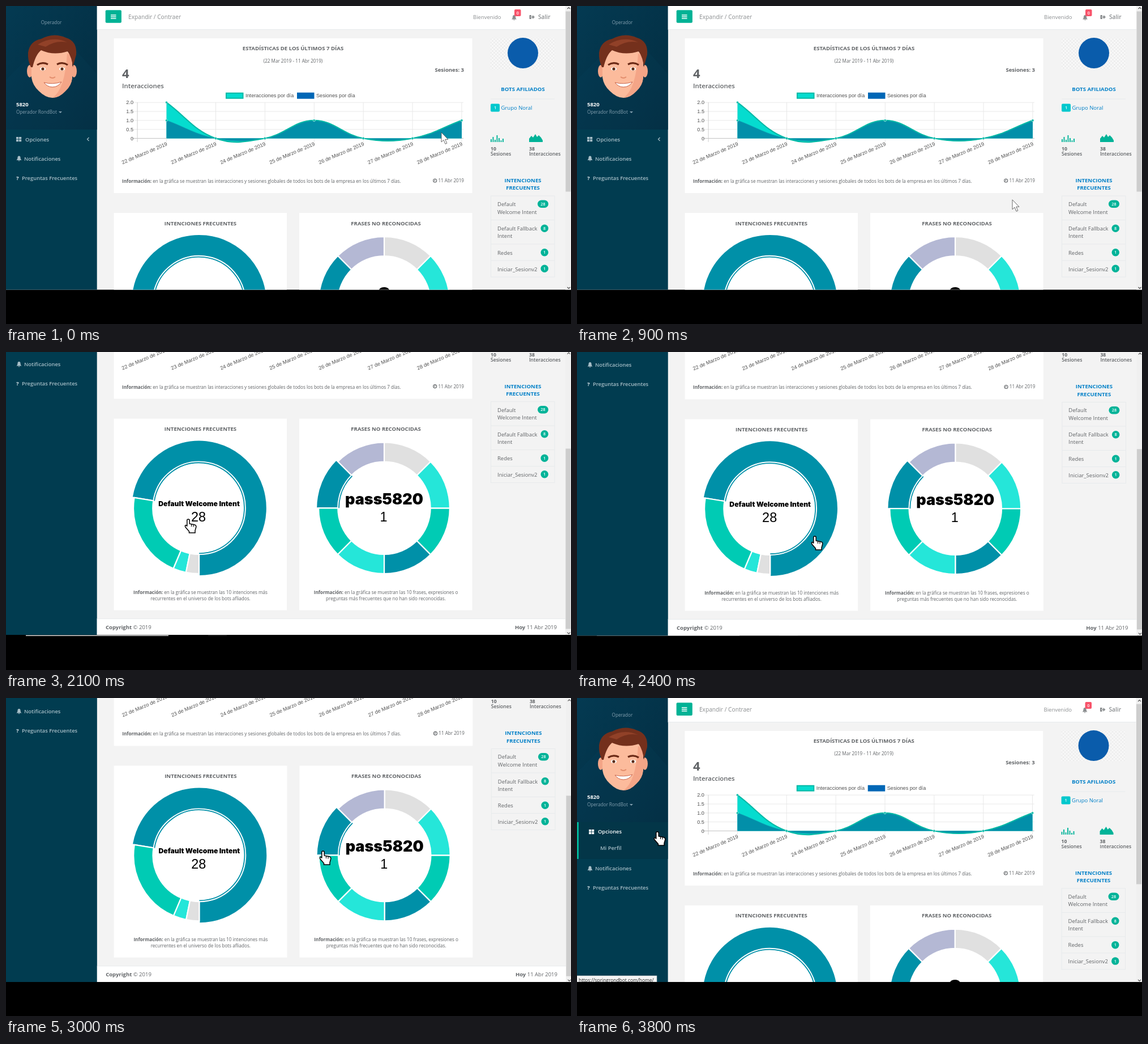
Recreate the animation shown at these times as an HTML page. Size 998 px wide and 561 px high, loop 4000 ms.

```html
<!DOCTYPE html>
<html lang="es">
<head>
<meta charset="utf-8">
<title>Panel de control</title>
<style>
  html, body { margin: 0; width: 100%; height: 100%; overflow: hidden; background: #000; }
  svg { display: block; width: 100%; height: 100%; }
  text { font: 9.5px "Open Sans", sans-serif; fill: #606366; white-space: pre; }
  .bold { font-weight: 700; }
  .title { font-weight: 700; font-size: 9.6px; text-anchor: middle; }
  .semi { font-weight: 600; }
  .mid { text-anchor: middle; }
  .end { text-anchor: end; }
  .small { font-size: 8.15px; }
  .nav { font-weight: 600; font-size: 9.4px; fill: #a7bec7; }
  .mark { font-weight: 800; fill: #b9ccd3; }
  .pale { fill: #84a0b0; }
  .white { fill: #fff; }
  .blue { fill: #0080c8; }
  .gray { fill: #8b8e90; }
  .large { font-size: 10.2px; }
  .count { font-size: 7.3px; font-weight: 600; fill: #fff; text-anchor: middle; }
  .axis { font: 9.15px "Liberation Sans", Arial, sans-serif; fill: #505050; }
  .heavy { font-family: Inter, "DejaVu Sans", sans-serif; font-weight: 900; fill: #000; text-anchor: middle; }
  .value { font: 23.4px "Liberation Sans", Arial, sans-serif; fill: #000; text-anchor: middle; }
</style>
</head>
<body>
<svg id="stage" viewBox="0 0 998 561"></svg>
<script>
const LOOP = 4000;
const GREEN = '#00b398', LINE = '#e7eaec', TEAL = '#00b8a5', DARK = '#0090a8';
const PALETTE = [DARK, '#00cbb4', '#25e6d9', '#e0e0e0', '#b4b8d4'];
const SIDEBAR = 160.7, MAX_SCROLL = 246;

// ---- drawing helpers ----
const text = (x, y, s, cls = '', extra = '') => `<text x="${x}" y="${y}" class="${cls}" ${extra}>${s}</text>`;
const rect = (x, y, w, h, fill, extra = '') => `<rect x="${x}" y="${y}" width="${w}" height="${h}" fill="${fill}" ${extra}/>`;
const path = (d, fill = 'none', extra = '') => `<path d="${d}" fill="${fill}" ${extra}/>`;
const stroke = (color, width) => `stroke="${color}" stroke-width="${width}"`;
const circle = (x, y, r, fill, extra = '') => `<circle cx="${x}" cy="${y}" r="${r}" fill="${fill}" ${extra}/>`;
const group = (id, body, extra = '') => `<g id="${id}" ${extra}>${body}</g>`;
const bold = s => `<tspan class="bold">${s}</tspan>`;
const bell = (x, y, fill) =>
  path('M-4.5 3q2-1.5 2-4.5 0-3 2.5-3t2.5 3q0 3 2 4.5zM-1.2 3.6h2.4q-.3 1.2-1.2 1.2t-1.2-1.2z', fill, `transform="translate(${x} ${y})"`);

// ---- sidebar ----
function avatar() {
  const skin = '#fcbb9c', shade = '#f4a587', hair = '#74301c';
  const eye = x => `<ellipse cx="${x}" cy="111" rx="5" ry="3" fill="#fff"/>` + circle(x, 111, 2.6, '#5b2c18');
  return `<ellipse cx="42" cy="115" rx="5" ry="11" fill="${shade}"/><ellipse cx="120" cy="115" rx="5" ry="11" fill="${shade}"/>` +
    path('M45 84V126Q47 140 58 150 70 162 82 162 94 162 105 150 116 140 117 126V84Q82 66 45 84z', skin) +
    path('M108 84L117 88V126Q116 140 105 150 94 162 82 162 104 148 108 84z', shade) +
    path('M44 108Q38 96 39 82 42 62 62 58 84 46 106 56 126 62 124 86L118 108Q117 92 109 80 84 88 62 78 52 86 47 108z', hair) +
    path('M56 68Q82 52 108 64 88 60 70 72z', '#914128') +
    path('M55 104Q64 98 74 103M90 103Q100 98 109 104', 'none', stroke('#6b2a16', 3.2)) +
    eye(65) + eye(99) +
    path('M77 125Q82 129 87 125', 'none', stroke('#e38d6c', 1.8)) +
    path('M67 135Q82 139 98 134 92 143 82 143 73 143 67 135z', '#fff', stroke('#c9654c', 1));
}

function sidebar() {
  const icon = x => [0, 5].map(i => [0, 4.5].map(j => rect(x + i, 231 + j, 4.2, 3.7, 'currentColor')).join('')).join('');
  return rect(0, -4, SIDEBAR, 764, '#013c50') + rect(0, -4, SIDEBAR, 222, 'url(#headShade)') +
    path(`M0 130L90 40 ${SIDEBAR} 120V218H0z`, '#0a4560', 'opacity=".15"') +
    text(80, 31.5, 'Operador', 'small mid pale') + avatar() +
    text(18, 177, '5820', 'bold white') + text(18, 190, 'Operador RondBot', 'small pale') +
    path('M93 186h6l-3 3z', '#84a0b0') +
    group('menuClosed', `<g color="#a7bec7">${icon(18)}</g>` + text(34, 238.5, 'Opciones', 'nav') +
      path('M146.5 232l-3 3 3 3', 'none', stroke('#a7bec7', 1.2))) +
    group('menuOpen', rect(0, 218, SIDEBAR, 65, '#033648') + rect(0, 218, 3, 65, GREEN) +
      `<g color="#fff">${icon(21)}</g>` + text(37, 238.5, 'Opciones', 'nav white') +
      text(41, 267.5, 'Mi Perfil', 'nav')) +
    group('menuTail', bell(23, 269, '#a7bec7') + text(32, 272.5, 'Notificaciones', 'nav') +
      text(18, 306.5, '?', 'nav mark') + text(28, 306.5, 'Preguntas Frecuentes', 'nav'));
}

// ---- top bar and footer ----
function bars() {
  return rect(SIDEBAR, -4, 828, 45, '#fff') + rect(SIDEBAR, 41, 828, 1, LINE) +
    rect(175.7, 7.2, 28.2, 22.6, '#00b295', 'rx="2"') +
    path('M185 16h9.5M185 19h9.5M185 22h9.5', 'none', stroke('#fff', 1.5)) +
    text(216, 23, 'Expandir / Contraer', 'gray large') +
    text(825, 23, 'Bienvenido', 'gray') + bell(897.5, 20.5, '#8b8e90') +
    rect(898, 6, 11.5, 12, '#f8536a', 'rx="2"') + text(903.8, 14.6, '0', 'count') +
    path('M928 16h-3.5v7h3.5M927 18.5h3v-2.5l4 3.5-4 3.5v-2.5h-3z', '#8b8e90') +
    text(940, 23, 'Salir', 'semi gray large') +
    rect(SIDEBAR, 718, 828, 40, '#fff') + rect(SIDEBAR, 717.5, 828, 1, LINE) +
    text(176, 736, bold('Copyright') + ' © 2019') + text(973, 736, bold('Hoy') + ' 11 Abr 2019', 'end');
}

// ---- line chart ----
const chartX = i => 283.5 + 86.9 * i;
const chartY = v => 233.5 - 31.7 * v;

function spline(points, tension = 0.4) {
  const dist = (a, b) => Math.hypot(a[0] - b[0], a[1] - b[1]);
  const handles = points.map((p, i) => {
    const a = points[i - 1] || p, b = points[i + 1] || p;
    const before = dist(a, p), after = dist(p, b);
    const handle = k => p.map((c, j) => c + k * tension / (before + after) * (b[j] - a[j]));
    return { back: handle(-before), ahead: handle(after) };
  });
  return points.slice(1).reduce((d, p, i) => `${d}C${handles[i].ahead} ${handles[i + 1].back} ${p}`, `M${points[0]}`);
}

function lineChart() {
  const series = [[2, 0, 0, 1, 0, 0, 1], [1, 0, 0, 1, 0, 0, 1]].map(values => values.map((v, i) => [chartX(i), chartY(v)]));
  let out = '';
  for (let v = 0; v <= 2; v += 0.5) {
    out += rect(222, chartY(v) - 0.4, 586, 0.9, v ? '#e6e6e6' : '#bdbdbd') +
      text(225, chartY(v) + 3.2, v ? v.toFixed(1) : '0', 'axis end');
  }
  out += rect(231.6, 170, 0.9, 70, '#c9c9c9');
  for (let i = 0; i < 7; i++) {
    const x = chartX(i);
    out += rect(x - 0.4, 170, 0.9, 70, '#e6e6e6') +
      text(0, 0, `${22 + i} de Marzo de 2019`, 'axis end', `transform="translate(${x + 2} 245.5) rotate(-23)"`);
  }
  series.forEach((pts, i) => out += path(`${spline(pts)}V${chartY(0)}H${chartX(0)}z`, ['#05dccf', '#028fa9'][i]));
  [1, 0].forEach(i => out += path(spline(series[i]), 'none', stroke(i ? '#0a9db0' : TEAL, i ? 1 : 2)));
  series.flat().forEach(([x, y]) => out += circle(x, y, 1.9, TEAL, stroke('#b9ebe6', 0.6)));
  return out + rect(389, 153.7, 29.5, 9, '#05dccf', stroke(TEAL, 2)) + text(423, 161, 'Interacciones por día', 'axis') +
    rect(514, 152.7, 30.5, 11, '#0067b6') + text(548, 161, 'Sesiones por día', 'axis');
}

function statsCard() {
  return rect(190.5, 57, 633, 273, '#fff') +
    text(507, 78, 'ESTADÍSTICAS DE LOS ÚLTIMOS 7 DÍAS', 'title') +
    text(507, 99.5, '(22 Mar 2019 - 11 Abr 2019)', 'small mid') +
    text(205, 126.5, '4', 'bold', 'style="font-size:22px"') +
    text(205, 144.5, 'Interacciones', 'semi', 'style="font-size:11.4px"') +
    text(809, 116, 'Sesiones: 3', 'bold end') + lineChart() +
    text(205, 312, bold('Información:') + ' en la gráfica se muestran las interacciones y sesiones globales de todos los bots de la empresa en los últimos 7 días.', 'small') +
    circle(757.7, 308, 3, 'none', stroke('#606366', 1.1)) + path('M757.7 306v2.2h-1.6', 'none', stroke('#606366', 0.9)) +
    text(809, 311, '11 Abr 2019', 'small end');
}

// ---- donuts: slices run counterclockwise from six o'clock ----
function donut(cx, values, selected, label, size, baseline) {
  const cy = 522.7, inner = 81.7, outer = 115.9, gap = 2.27;
  const total = values.reduce((a, b) => a + b);
  const at = (r, deg) => {
    const a = deg * Math.PI / 180;
    return `${(cx + r * Math.sin(a)).toFixed(2)} ${(cy + r * Math.cos(a)).toFixed(2)}`;
  };
  let start = 0, out = '';
  values.forEach((v, i) => {
    const stop = start + gap + (360 - gap * values.length) * v / total;
    const large = +(stop - start > 180), color = PALETTE[i % PALETTE.length];
    const arc = (r, from, to, sweep) => `${at(r, from)}A${r} ${r} 0 ${large} ${sweep} ${at(r, to)}`;
    const edge = i === selected ? outer + 4 : outer;
    out += path(`M${arc(edge, start, stop, 0)}L${arc(inner, stop, start, 1)}z`, color, stroke('#fff', 2.2));
    if (i === selected) out += path(`M${arc(inner - 1.7, start, stop, 0)}`, 'none', stroke(color, 1.8));
    start = stop;
  });
  return out + text(cx, baseline, label, 'heavy', `style="font-size:${size}px"`) +
    text(cx - 1, 546, values[selected], 'value');
}

const donutCard = (x, title, lines) => {
  const mid = x + 153;
  return rect(x, 365, 305.5, 338, '#fff') + text(mid, 386.5, title, 'title') +
    text(mid, 674, bold('Información:') + ' ' + lines[0], 'small mid') + text(mid, 685, lines[1], 'small mid');
};

const PHRASES = {
  a: [0, 'a', 37, 516],
  short: [4, 'pas5820', 30.5, 516.5],
  long: [5, 'pass5820', 27, 516]
};
const phraseDonut = key => donut(668, Array(8).fill(1), ...PHRASES[key]);

// ---- right column ----
function aside() {
  const badge = (y, n) => rect(n > 9 ? 939 : 944.5, y - 6.5, n > 9 ? 19 : 13.5, 13.5, GREEN, 'rx="6.75"') +
    text(n > 9 ? 948.5 : 951.2, y + 2.8, n, 'count');
  const spark = [5, 9, 4, 12, 7, 3, 6].map((h, i) => rect(856 + i * 3.5, 240 - h, 1.9, h, GREEN)).join('');
  return rect(856, 56, 114, 56, 'url(#checker)') + circle(913, 83, 27, '#0a5cab') +
    text(913, 149.5, 'BOTS AFILIADOS', 'title blue') + rect(856, 163.5, 113, 1, LINE) +
    rect(856, 172.5, 16, 14, '#00c8cd', 'rx="2"') + text(864, 182.3, '1', 'count') +
    text(874.5, 182.5, 'Grupo Noral', 'blue') + spark +
    path('M924 240v-6l4-5 3 3 4-6 3 5 3-3 4 4 3 5v3z', GREEN) +
    [[856, '10', 'Sesiones'], [924, '38', 'Interacciones']].map(([x, n, s]) =>
      text(x, 255, n, 'bold', 'style="font-size:8.6px"') + text(x, 264, s, 'semi', 'style="font-size:8.6px"')).join('') +
    text(913, 311, 'INTENCIONES', 'title blue') + text(913, 324.3, 'FRECUENTES', 'title blue') +
    rect(856.5, 335, 112.5, 143, 'none', stroke(LINE, 1)) +
    [377.5, 420, 449].map(y => rect(856.5, y - 0.5, 112.5, 1, LINE)).join('') +
    text(868, 353, 'Default') + text(868, 366.5, 'Welcome Intent') + badge(349, 28) +
    text(868, 396, 'Default Fallback') + text(868, 409, 'Intent') + badge(392, 8) +
    text(868, 438.5, 'Redes') + badge(434.5, 1) + text(868, 467.5, 'Iniciar_Sesionv2') + badge(463, 1);
}

// ---- scene ----
const page = rect(0, -4, 1002, 764, '#f3f3f3') + sidebar() + bars() + statsCard() +
  donutCard(190.5, 'INTENCIONES FRECUENTES', ['en la gráfica se muestran las 10 intenciones más', 'recurrentes en el universo de los bots afliados.']) +
  donutCard(518, 'FRASES NO RECONOCIDAS', ['en la gráfica se muestran las 10 frases, expresiones o', 'preguntas más frecuentes que no han sido reconocidas.']) +
  donut(341, [28, 8, 1, 1], 0, 'Default Welcome Intent', 12.2, 519) + group('phrases', '') + aside();

const scrollbar = rect(988, -4, 14, 505, '#f0f0f0') + rect(988.5, 0, 9, 318, '#cdcdcd', 'id="thumb"') +
  path('M991.5 5l2.5-2.5 2.5 2.5M991.5 496l2.5 2.5 2.5-2.5', 'none', stroke('#505050', 1.2));

document.getElementById('stage').innerHTML = `<defs>
  <clipPath id="window"><rect y="-4" width="1002" height="504.5"/></clipPath>
  <linearGradient id="headShade" x2="1" y2="1"><stop stop-color="#043a52"/><stop offset="1" stop-color="#032d41"/></linearGradient>
  <pattern id="checker" width="6" height="6" patternUnits="userSpaceOnUse"><path d="M0 0h6v6H0z" fill="#f8f8f8"/><path d="M0 0h3v3H0zM3 3h3v3H3z" fill="#eee"/></pattern>
</defs>` +
  group('view', rect(35, 501, 252, 1.6, '#e8e8e8') + rect(357, 501, 33, 1, '#333') +
    `<g clip-path="url(#window)">${group('scroll', page)}${scrollbar}</g>`) +
  group('status', rect(0, 490, 141, 11, '#f5f5f5', stroke('#b5b5b5', 0.6)) +
    text(3, 501, 'https://springrondbot.com/home/', '', 'style="font-size:8.4px;fill:#222"')) +
  rect(0, 501, 998, 60, '#000') +
  group('arrow', path('M0 0V17l4-3.6 3 7 2.8-1.2-3-6.800H12z', '#fff', stroke('#444', 0.8))) +
  group('hand', path('M-2.2 2a2.2 2 0 0 1 4.4 0V8L11 9.8q3.2.8 2.8 4L12 20v4H1.5v-2.5L-5 14q-1.6-3 .6-3.5 1.2 0 2.2 2z', '#fff', stroke('#000', 1.5)) +
    path('M5.5 9v4M9 10v3.5', 'none', stroke('#000', 1.1)));

// ---- motion ----
const STEPS = [0, 100, 200, 300, 400, 500, 600, 700, 800, 900, 1300, 1700, 1800, 1900, 2000, 2100, 2200,
  2400, 2600, 2800, 3000, 3200, 3300, 3400, 3500, 3600, 3800];
const CURSOR = [[0, 769, 223], [600, 769, 318], [800, 769, 339], [1300, 769, 353], [1700, 680, 300], [1800, 575, 250],
  [2000, 390, 275], [2100, 322, 295], [2200, 325, 305], [2400, 420, 325], [2800, 705, 374], [3000, 560, 270],
  [3200, 390, 265], [3500, 208, 264], [3600, 185, 250], [3800, 142, 236]];
const VIEW = [[0, 1, 0], [900, 1, 0], [1300, 0.9976, 0], [2100, 1, -1.4], [2800, 1.001, 0.5], [3500, 1.001, 0], [3800, 0.9995, 1.1]];
const SCROLL = [[0, 0], [900, 0], [1300, MAX_SCROLL], [3000, MAX_SCROLL], [3200, 205], [3500, 93], [3800, 0]];
const PHRASE = [[0, 'a'], [1300, 'short'], [1800, 'long'], [2600, 'a'], [3000, 'long'], [3800, 'a']];

const lastAt = (keys, t) => keys.filter(k => k[0] <= t).pop();

function sample(keys, t) {
  const a = lastAt(keys, t), b = keys[keys.indexOf(a) + 1] || a;
  const k = a === b ? 0 : (t - a[0]) / (b[0] - a[0]);
  return a.slice(1).map((v, i) => v + (b[i + 1] - v) * k);
}

const el = id => document.getElementById(id);
const show = (id, on) => el(id).style.display = on ? '' : 'none';
const move = (id, x, y) => el(id).setAttribute('transform', `translate(${x} ${y})`);
let shownStep = -1;

function render(time) {
  const t = STEPS.filter(s => s <= time % LOOP).pop();
  if (t === shownStep) return;
  shownStep = t;
  const [scale, shift] = sample(VIEW, t), [offset] = sample(SCROLL, t), [x, y] = sample(CURSOR, t);
  const open = t >= 3800, pointing = t >= 1700;
  el('view').setAttribute('transform', `translate(0 ${shift}) scale(${scale})`);
  move('scroll', 0, -offset);
  move('thumb', 0, 9.5 + offset * 0.66);
  move('menuTail', 0, open ? 31 : 0);
  show('menuOpen', open);
  show('menuClosed', !open);
  show('status', open);
  show('hand', pointing);
  show('arrow', !pointing);
  move(pointing ? 'hand' : 'arrow', x, y);
  el('phrases').innerHTML = phraseDonut(lastAt(PHRASE, t)[1]);
}

const began = performance.now();
function tick() {
  render(performance.now() - began);
  requestAnimationFrame(tick);
}
tick();
</script>
</body>
</html>
```
